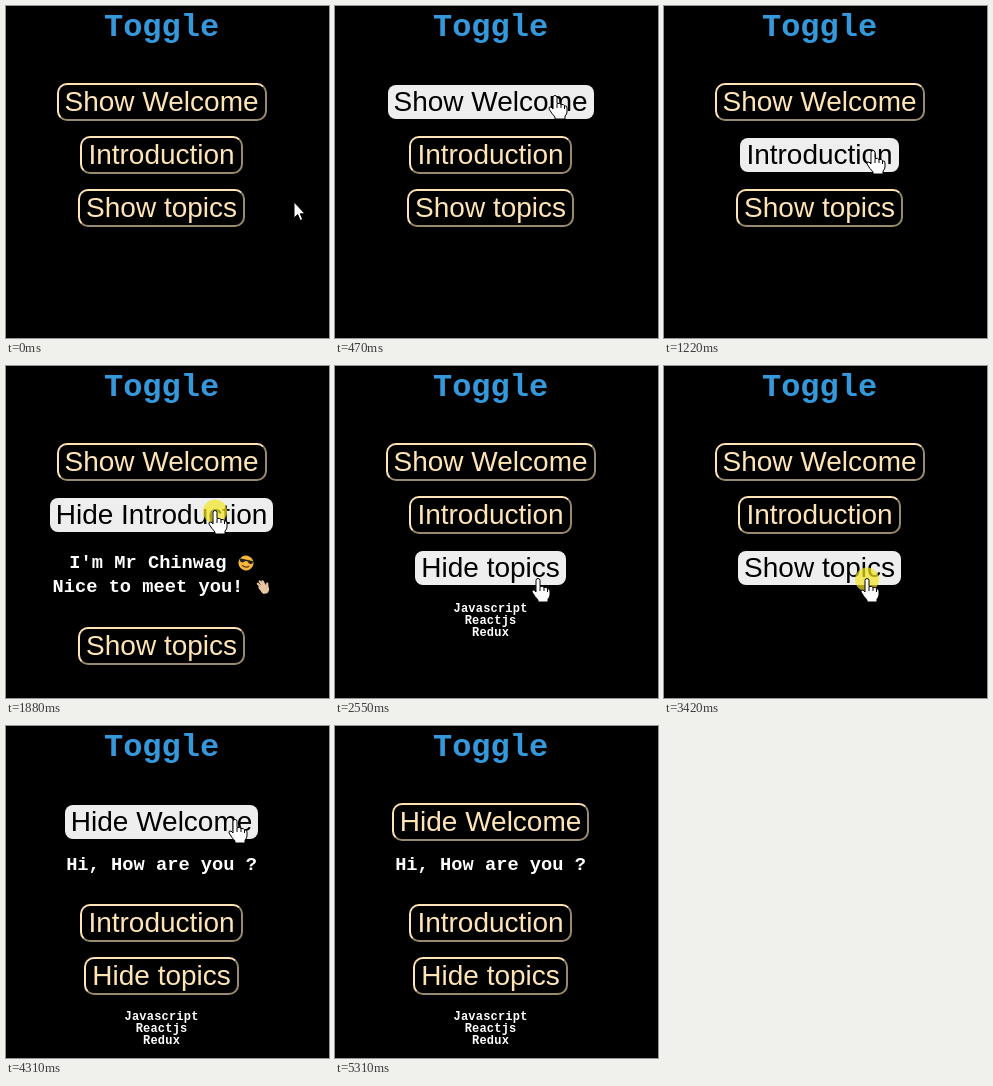
Recreate the animation shown at these times as an HTML page. Size 323x332 px, loop 5.91 s.

```html
<!DOCTYPE html>
<html lang="en">
<head>
<meta charset="utf-8">
<title>Toggle</title>
<style>
  html, body { margin: 0; width: 100%; height: 100%; overflow: hidden; background: #000; }
  h1, section, p, #cursor { position: absolute; left: 0; margin: 0; }
  h1, section, p { width: 311.1px; text-align: center; }
  h1, p { font-family: "Liberation Mono", "DejaVu Sans Mono", monospace; font-weight: 700; white-space: pre; }
  h1 { top: 6px; font-size: 32px; line-height: 32px; color: #3498db; }
  button {
    box-sizing: border-box; height: 38px; padding: 1px 6px;
    font: 28px/32px "Liberation Sans", Arial, sans-serif; color: #ffe4b5;
    background: #000 padding-box; border: 2px solid; border-radius: 10px;
    border-color: #ffe4b5 #998a6d #998a6d #ffe4b5;
  }
  button.hover { color: #000; background-color: #eee; border-color: transparent; }
  p { color: #fff; font-size: 18.72px; line-height: 24px; }
  p svg { width: 16px; height: 16px; vertical-align: -3px; }
  #welcome p { top: 50px; }
  #intro p { top: 55px; }
  #topics p { top: 54px; font-size: 12px; line-height: 12px; letter-spacing: .2px; }
  #cursor { top: 0; overflow: visible; }
</style>
</head>
<body>
<h1>Toggle</h1>
<section id="welcome"><button></button><p>Hi, How are you ?</p></section>
<section id="intro"><button></button><p>I'm Mr Chinwag <svg viewBox="0 0 17 17"><g transform="rotate(12 8.5 8.5)"><circle cx="8.5" cy="8.5" r="8" fill="#f6b73c"/><path d="M1 5H16L15 8Q12 10 9.5 6.5H7.5Q5 10 2 8Z" fill="#26211c"/><path d="M5 11.5Q9 14.5 12.500 11" fill="none" stroke="#6b3c12" stroke-width="1.4"/></g></svg>
Nice to meet you! <svg viewBox="0 0 17 17"><g fill="none" stroke="#e8c4a0" stroke-width="2.4" stroke-linecap="round"><path d="M8 10 3 5M9 8 5 2.500M11 8 8 2.500M13 9V5"/><path d="M5 9 9 14" stroke-width="3"/></g><ellipse cx="10.5" cy="11" rx="4.5" ry="4.8" fill="#e8c4a0"/></svg></p></section>
<section id="topics"><button></button><p>Javascript
Reactjs
Redux</p></section>
<svg id="cursor" width="1" height="1">
  <circle id="press" cy=".5" r="12" fill="#f2e620" opacity=".7"/>
  <g fill="#fff" stroke="#000" stroke-linejoin="round">
    <path id="arrow" d="M0 0V16L3.7 12.6 6.2 18.5 8.7 17.4 6.3 11.8H11Z"/>
    <g id="hand">
      <path d="M-2 13V1.5Q-2-.5 0-.5T2 1.5V7.5Q5 6.8 6 8.5Q9 8 9.5 9.8Q12 9.5 12 12V16Q12 18 10 20V23H0V21Q-3 18-6 13Q-6.5 10.5-4 11Z"/>
      <path d="M2 8V12M6 8.5V12M9.5 10V13" fill="none"/>
    </g>
  </g>
</svg>
<script>
const LOOP = 5910, TICK = 67.1;
const byId = id => document.getElementById(id);
const show = (el, on) => { el.style.visibility = on ? 'visible' : 'hidden'; };

// All times below are in ticks. gap: extra height while the panel is open.
const panels = [
  { id: 'welcome', labels: ['Show Welcome', 'Hide Welcome'], gap: 48 },
  { id: 'intro', labels: ['Introduction', 'Hide Introduction'], gap: 78 },
  { id: 'topics', labels: ['Show topics', 'Hide topics'], gap: 0 }
].map(panel => {
  const box = byId(panel.id);
  return { ...panel, box, button: box.querySelector('button'), text: box.querySelector('p') };
});

// [press, release, panel]
const clicks = [
  [8, 10, 0], [14, 15, 0], [22, 24, 1], [28, 29, 1],
  [36, 38, 2], [45, 46, 2], [51, 52, 2], [62, 64, 0]
];

// [tick, x, y]
const path = [
  [0, 288, 196], [7, 220, 90], [14, 220, 90], [18, 209, 145],
  [29, 209, 145], [33, 203, 213], [52, 203, 213], [58, 233, 117],
  [59, 229, 100], [61, 229, 94], [76, 229, 94], [77, 250, 140], [78, 280, 249]
];
const CURSOR_GONE = 79;

function cursorAt(tick) {
  const i = path.findIndex(point => point[0] >= tick);
  if (i < 0) return path.at(-1).slice(1);
  if (i === 0) return path[0].slice(1);
  const [a, b] = [path[i - 1], path[i]];
  const k = (tick - a[0]) / (b[0] - a[0]);
  return [1, 2].map(n => Math.round(a[n] + (b[n] - a[n]) * k));
}

function render(tick) {
  const [x, y] = cursorAt(tick);
  const present = tick < CURSOR_GONE;
  let top = 77, overButton = false;

  panels.forEach((panel, i) => {
    const { box, button, text, labels, gap } = panel;
    const open = clicks.filter(c => c[2] === i && c[1] <= tick).length % 2;
    button.textContent = labels[open];
    box.style.top = top + 'px';
    show(text, open);
    const left = button.offsetLeft;
    const hover = present && x >= left && x < left + button.offsetWidth && y >= top && y < top + 38;
    button.className = hover ? 'hover' : '';
    overButton ||= hover;
    top += 53 + (open ? gap : 0);
  });

  byId('cursor').style.transform = `translate(${x}px, ${y}px)`;
  show(byId('arrow'), present && !overButton);
  show(byId('hand'), overButton);
  show(byId('press'), clicks.some(c => tick >= c[0] && tick < c[1]));
}

let last = -1;
function frame() {
  const tick = Math.floor(performance.now() % LOOP / TICK + .05);
  if (tick !== last) render(last = tick);
  requestAnimationFrame(frame);
}
frame();
</script>
</body>
</html>
```
